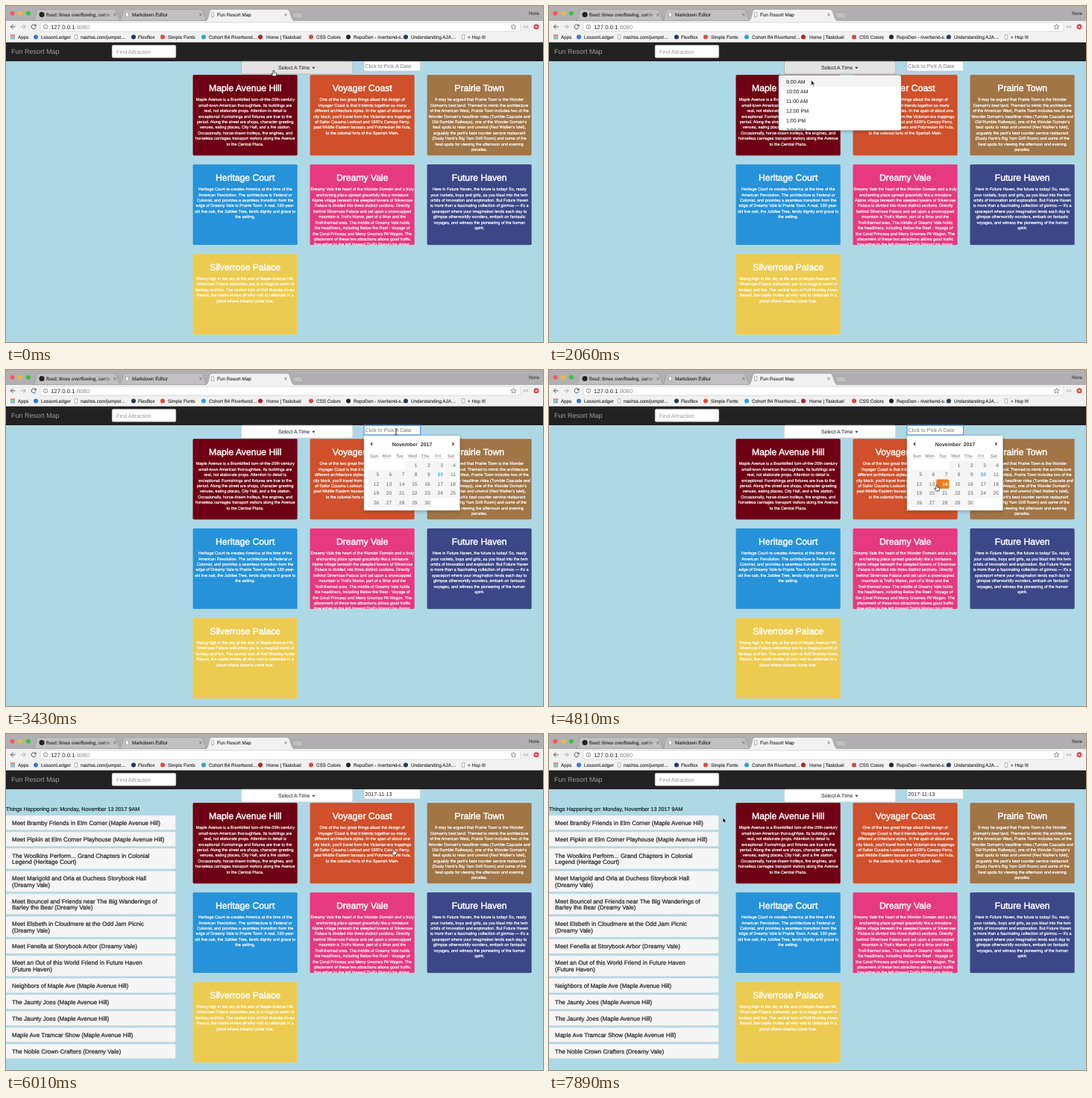
An HTML page for the animation above (8000 ms loop, 720x450 px).

```html
<!DOCTYPE html>
<html lang="en">
<head>
<meta charset="utf-8">
<title>Fun Resort Map</title>
<style>
  html, body { margin: 0; width: 100%; height: 100%; overflow: hidden; background: #add8e6; }
  #stage { display: block; width: 100vw; height: 100vh; }
  text { font-family: "Liberation Sans", Arial, sans-serif; text-rendering: geometricPrecision; white-space: pre; }
  .shadow { filter: drop-shadow(0 1.5px 2px rgba(0, 0, 0, .3)); }
</style>
</head>
<body>
<svg id="stage" viewBox="0 0 720 450"></svg>
<script>
const LOOP = 8000, STEP = 171.6;
const stage = document.getElementById('stage');

const text = (str, x, y, size, fill, { anchor = 'start', heavy = 0, extra = '' } = {}) =>
  `<text x="${x}" y="${y}" font-size="${size}" fill="${fill}" text-anchor="${anchor}"` +
  (heavy ? ` stroke="${fill}" stroke-width="${heavy}"` : '') + ` ${extra}>${str}</text>`;
const rect = (x, y, w, h, fill, extra = '') =>
  `<rect x="${x}" y="${y}" width="${w}" height="${h}" fill="${fill}" ${extra}/>`;
const dot = (x, y, r, fill) => `<circle cx="${x}" cy="${y}" r="${r}" fill="${fill}"/>`;
const path = (d, fill, extra = '') => `<path d="${d}" fill="${fill}" ${extra}/>`;
const line = (d, color, width = 1) => path(d, 'none', `stroke="${color}" stroke-width="${width}"`);
const group = (id, content, extra = '') => `<g id="${id}" ${extra}>${content}</g>`;
const page = (x, y) => rect(x - 1.8, y - 2.7, 3.6, 5.4, '#fff', 'stroke="#888" stroke-width=".6"');

function browser() {
  const strip = '#b1afb1', idleTab = '#c1bfc1', toolbar = '#f2f1f2', edge = '#969496';
  const tab = (x, fill) =>
    path(`M${x} 19.5Q${x + 2} 19 ${x + 3} 16L${x + 5} 7Q${x + 6} 4.5 ${x + 8} 4.5H${x + 109}` +
      `Q${x + 111} 4.5 ${x + 112} 7L${x + 115} 16Q${x + 116} 19 ${x + 118} 19.5Z`, fill, `stroke="${edge}" stroke-width=".6"`);
  const close = x => line(`M${x - 1.6} 10l3.2 3.2m0 -3.2l-3.2 3.2`, '#555', .7);
  const bookmarks = [
    [40, 47, '#3478d8', 'LessonLedger'], [94, 100, '', 'nashss.com/jumpst…'], [171, 177, '#20395a', 'FlexBox'],
    [210, 217, '#e04a38', 'Simple Fonts'], [265, 272, '#28a5cf', 'Cohort B4 Riverbend…'],
    [341, 349, '#b32020', 'Home | Taskduel'], [409, 416, '#d64b46', 'CSS Colors'],
    [459, 466, '#222', 'RepoDen - riverbend-s…'], [536, 543, '#263c55', 'Understanding AJA…'], [613, 619, '', '+ Hop It!']
  ];
  let out = rect(0, 0, 720, 20, strip) + rect(0, 19.5, 720, 30, toolbar) + line('M0 19.5H720', edge, .6);
  ['#fb5a55', '#e7bb3d', '#32c548'].forEach((color, i) => out += dot(8.5 + 10.7 * i, 9.7, 3, color));
  out += tab(36, idleTab) + tab(152, idleTab) + tab(268, toolbar) + rect(269, 19, 116, 1, toolbar);
  out += dot(48, 11.6, 3.5, '#222') + page(162.5, 11.6) + page(277, 11.6);
  out += text('fixed: times overflowing, cente', 54, 13.9, 6.4, '#222', { heavy: .08 }) + rect(133, 8, 8, 8, idleTab, 'opacity=".5"');
  out += text('Markdown Editor', 169, 13.9, 6.4, '#222', { heavy: .08 }) + text('Fun Resort Map', 283, 13.9, 6.4, '#222', { heavy: .08 });
  out += [146, 261, 375].map(close).join('');
  out += path('M384 9H395Q396.5 9 397 10.5L399 16H388Q386.5 16 386 14.5Z', idleTab, `stroke="${edge}" stroke-width=".5"`);
  out += text('Nora', 701, 12, 6.4, '#222');

  out += line('M12.5 27.8H6.5M9.3 24.8L6.3 27.8L9.3 30.8', '#555') + line('M20 27.8H26M23.3 24.8L26.3 27.8L23.3 30.8', '#aaa');
  out += line('M39.7 26.2A3 3 0 1 0 40 28.6', '#555') + path('M40.6 24.2V27.2H37.6Z', '#555');
  out += rect(46, 22, 644, 12, '#fff', 'rx="2" stroke="#c8c6c8" stroke-width=".6"');
  out += `<circle cx="53" cy="27.8" r="2.8" fill="none" stroke="#666" stroke-width=".7"/>` + line('M53 27.3V29.6M53 25.9V26.6', '#666', .7);
  out += text('127.0.0.1<tspan fill="#888">:8080</tspan>', 60, 30.5, 7.8, '#222');
  out += path('M680.5 24.3L681.5 26.7L684 26.9L682.1 28.5L682.7 31L680.5 29.7L678.3 31L678.9 28.5L677 26.9L679.5 26.7Z', 'none', 'stroke="#666" stroke-width=".7"');
  out += line('M694.5 25.5V30M699.5 25.5V30', '#b9a4a8', .8) + dot(697, 27.8, 1.1, '#b9a4a8');
  out += dot(711, 27.8, 3.5, '#d8453d') + line('M709.3 27.8H712.7M711 26.1V29.5', '#fff', .8);

  ['#e2483d', '#46a851', '#3f7de0'].forEach((color, row) => {
    for (let col = 0; col < 3; col++) out += rect(6 + 2.2 * col, 38.3 + 2.2 * row, 1.6, 1.6, color);
  });
  out += text('Apps', 16, 43.7, 6.3, '#222', { heavy: .1 });
  for (const [iconX, x, color, label] of bookmarks)
    out += (color ? dot(iconX, 41.4, 3, color) : page(iconX, 41.4)) + text(label, x, 43.7, 6.3, '#222', { heavy: .1 });
  return out;
}

function navbar() {
  return rect(0, 49, 720, 25, '#222') + line('M0 49H720', '#111', .6) +
    text('Fun Resort Map', 7, 64.1, 9, '#9d9d9d') +
    rect(142.2, 52.4, 85.6, 16.9, '#fff', 'rx="1.6" stroke="#ccc" stroke-width=".4"') +
    text('Find Attraction', 148, 63.6, 7.3, '#999');
}

const lands = [
  ['Maple Avenue Hill', '#6e0013', `Maple Avenue is a Brambified turn-of-the-20th-century
small-town American thoroughfare. Its buildings are
real, not elaborate props. Attention to detail is
exceptional: Furnishings and fixtures are true to the
period. Along the street are shops, character-greeting
venues, eating places, City Hall, and a fire station.
Occasionally, horse-drawn trolleys, fire engines, and
horseless carriages transport visitors along the Avenue
to the Central Plaza.`],
  ['Voyager Coast', '#cf502a', `One of the two great things about the design of
Voyager Coast is that it blends together so many
different architecture styles. In the span of about one
city block, you'll travel from the Victorian-era trappings
of Sailor Cousins Lookout and 1920's Canopy Ferry,
past Middle Eastern bazaars and Polynesian tiki huts,
to the colonial forts of the Spanish Main.`],
  ['Prairie Town', '#a17546', `It may be argued that Prairie Town is the Wonder
Domain's best land. Themed to mimic the architecture
of the American West, Prairie Town includes two of the
Wonder Domain's headliner rides (Tumble Cascade and
Old Rumble Railways), one of the Wonder Domain's
best spots to relax and unwind (Ned Walker's Islet),
arguably the park's best counter service restaurant
(Dusty Hank's Big Yarn Grill Room) and some of the
best spots for viewing the afternoon and evening
parades.`],
  ['Heritage Court', '#2592d9', `Heritage Court re-creates America at the time of the
American Revolution. The architecture is Federal or
Colonial, and provides a seamless transition from the
edge of Dreamy Vale to Prairie Town. A real, 130-year-
old live oak, the Jubilee Tree, lends dignity and grace to
the setting.`],
  ['Dreamy Vale', '#e6397f', `Dreamy Vale the heart of the Wonder Domain and a truly
enchanting place spread gracefully like a miniature
Alpine village beneath the steepled towers of Silverrose
Palace is divided into three distinct sections. Directly
behind Silverrose Palace and set upon a snowcapped
mountain is Troll's Manor, part of a Briar and the
Troll-themed area. The middle of Dreamy Vale holds
the headliners, including Below the Reef - Voyage of
the Coral Princess and Merry Gnomes Pit Wagon. The
placement of these two attractions allows good traffic
flow either to the left (toward Troll's Manor) for dining,`],
  ['Future Haven', '#3c4788', `Here in Future Haven, the future is today! So, ready
your rockets, boys and girls, as you blast into the twin
orbits of innovation and exploration. But Future Haven
is more than a fascinating collection of gizmos — it's a
spaceport where your imagination lends each day to
glimpse otherworldly wonders, embark on fantastic
voyages, and witness the pioneering of the human
spirit.`],
  ['Silverrose Palace', '#edcb50', `Rising high in the sky at the end of Maple Avenue Hill,
Silverrose Palace welcomes you to a magical world of
fantasy and fun. The central icon of Rolf Bramby Acres
Resort, the castle invites all who visit to celebrate in a
place where dreams come true.`]
];

function card([title, color, body], i) {
  const x = 250 + 157 * (i % 3), y = 91.7 + 119.9 * Math.floor(i / 3);
  const lines = body.split('\n').map((str, row) =>
    text(str, 70.7, 35.5 + 7.44 * row, 5.5, '#fff', { anchor: 'middle', heavy: .2 })).join('');
  return `<svg x="${x}" y="${y}" width="141.2" height="109">` +
    rect(.3, .3, 140.6, 108.4, color, 'rx="1.8" stroke="#ddd" stroke-opacity=".6" stroke-width=".6"') +
    text(title, 70.7, 22.7, 12.2, '#fff', { anchor: 'middle', heavy: .45 }) + lines + '</svg>';
}

const events = [
  'Meet Bramby Friends in Elm Corner (Maple Avenue Hill)',
  'Meet Pipkin at Elm Corner Playhouse (Maple Avenue Hill)',
  'The Woolkins Perform... Grand Chapters in Colonial\nLegend (Heritage Court)',
  'Meet Marigold and Orla at Duchess Storybook Hall\n(Dreamy Vale)',
  'Meet Bouncel and Friends near The Big Wanderings of\nBarley the Bear (Dreamy Vale)',
  'Meet Elsbeth in Cloudmere at the Odd Jam Picnic\n(Dreamy Vale)',
  'Meet Fenella at Storybook Arbor (Dreamy Vale)',
  'Meet an Out of this World Friend in Future Haven\n(Future Haven)',
  'Neighbors of Maple Ave (Maple Avenue Hill)',
  'The Jaunty Joes (Maple Avenue Hill)',
  'The Jaunty Joes (Maple Avenue Hill)',
  'Maple Ave Tramcar Show (Maple Avenue Hill)',
  'The Noble Crown Crafters (Dreamy Vale)'
];

function eventList() {
  let y = 108;
  let out = text('Things Happening on: Monday, November 13 2017 9AM', 0, 102.6, 7.2, '#1c2a33', { heavy: .22 });
  for (const event of events) {
    const rows = event.split('\n'), height = rows.length > 1 ? 30.4 : 22;
    out += rect(-1, y + 1.1, 228.3, height - 2.7, '#f5f5f5', 'rx="1.5" stroke="#d8d8d8" stroke-width=".5"');
    rows.forEach((str, i) => out += text(str, 8, y + 13.8 + 8.6 * i, 8, '#222', { heavy: .22 }));
    y += height;
  }
  return out;
}

function timeMenu() {
  const hours = ['9:00 AM', '10:00 AM', '11:00 AM', '12:00 PM', '1:00 PM', '2:00 PM'];
  return rect(308, 92.8, 164, 73.6, '#fff', 'rx="2" stroke="#bbb" stroke-width=".5" class="shadow"') +
    '<svg x="308" y="93" width="164" height="73.2">' +
    rect(0, 2, 164, 13, '#f3f3f3', 'id="menuHover"') +
    hours.map((hour, i) => text(hour, 10, 11.1 + 13 * i, 7, '#333', { heavy: .08 })).join('') + '</svg>';
}

function calendar() {
  const cell = 17.15, left = 485, rowHeight = 12.5, top = 121.4;
  let out = rect(480, 88, 128.5, 100, '#fff', 'stroke="#ccc" stroke-width=".5" class="shadow"');
  out += text('November  2017', 544.5, 101.7, 7, '#333', { anchor: 'middle', extra: 'font-weight="bold"' });
  out += path('M491.2 96.3V101.7L488.2 99Z', '#555') + path('M598.4 96.3V101.7L601.4 99Z', '#555');
  ['Sun', 'Mon', 'Tue', 'Wed', 'Thu', 'Fri', 'Sat'].forEach((day, i) => {
    const x = left + cell * (i + .5);
    out += text(day, x, 117, 5.8, '#999', { anchor: 'middle', extra: 'font-weight="bold"' });
    out += line(`M${x - 5.5} 118.4h11`, '#bbb', .5);
  });
  for (let day = 1; day <= 30; day++) {
    const slot = day + 2, x = left + cell * (slot % 7), y = top + rowHeight * Math.floor(slot / 7);
    const label = (color, extra = '') => text(day, x + cell - 2, y + 8.5, 6.7, color, { anchor: 'end', extra });
    out += rect(x, y, cell, rowHeight, '#f5f5f5');
    out += day === 10 ? label('#3af', 'font-weight="bold"') : label('#666');
    if (day === 14)
      out += group('dayHover', rect(x, y, cell, rowHeight, '#f07a14', 'rx="1.5"') + label('#fff', 'font-weight="bold"'));
  }
  return out;
}

const outline = (fill, edge) => `fill="${fill}" stroke="${edge}" stroke-width=".7" stroke-linejoin="round"`;
const cursorShapes =
  `<path id="hand" d="M-.9 .6Q0 -.8 .9 .6V2.9L3.4 3.5Q4.2 3.8 4 5L3.2 8H-1L-3.2 4.8Q-3 3.6 -1.8 4.4L-.9 5.2Z" ${outline('#fff', '#111')}/>` +
  `<path id="arrow" d="M0 0V7.2L1.7 5.7L2.8 8.1L4 7.5L2.9 5.2H5.2Z" ${outline('#000', '#fff')}/>` +
  group('beam', line('M-1.6 -4Q0 -4 0 -3V3Q0 4 -1.6 4M1.6 -4Q0 -4 0 -3M0 3Q0 4 1.6 4', '#111', .8));

stage.innerHTML = rect(0, 0, 720, 450, '#add8e6') + browser() + navbar() +
  rect(315.5, 74.2, 149.3, 16.8, '#fff', 'rx="1.8" stroke-width=".7" id="button"') +
  text('Select A Time', 365, 85.4, 7, '#333', { heavy: .08 }) + path('M410.3 81.8H414.5L412.4 84.2Z', '#333') +
  rect(480, 74.2, 75.6, 12.8, '#fff', 'stroke="#bbb" stroke-width=".6" id="dateBox"') +
  text('', 481.3, 82.9, 7.2, '#777', { extra: 'id="dateText"' }) +
  lands.map(card).join('') + group('events', eventList()) + group('menu', timeMenu()) +
  group('calendar', calendar()) + group('cursor', cursorShapes);

const part = Object.fromEntries([...stage.querySelectorAll('[id]')].map(el => [el.id, el]));
const show = (name, visible) => part[name].setAttribute('display', visible ? 'inline' : 'none');
const setAll = (name, attrs) => Object.entries(attrs).forEach(([key, value]) => part[name].setAttribute(key, value));

// Pointer stops: time, x, y
const stops = [
  [0, 358.8, 86], [1200, 358.8, 86], [1850, 351.6, 99.2], [2350, 351.6, 99.2], [3000, 523, 82.8],
  [3550, 523, 82.8], [4550, 519.8, 154], [6100, 519.8, 154], [7250, 233, 111.8], [LOOP, 233, 111.8]
];

function pointer(t) {
  const i = stops.findIndex(stop => stop[0] > t);
  const [t0, x0, y0] = stops[i - 1], [t1, x1, y1] = stops[i];
  const u = (t - t0) / (t1 - t0), eased = u * u * (3 - 2 * u);
  return [x0 + (x1 - x0) * eased, y0 + (y1 - y0) * eased];
}

function draw(t) {
  const menuOpen = t >= 500 && t < 2350, calendarOpen = t >= 3080 && t < 5140, picked = t >= 5140;
  const [x, y] = pointer(t);
  const onButton = y < 91 && x < 465;
  const pressed = menuOpen && onButton, lit = menuOpen || onButton;
  setAll('button', {
    fill: pressed ? '#d2d1d1' : lit ? '#e4e3e3' : '#fff',
    stroke: pressed ? '#8c8c8c' : lit ? '#adadad' : '#ccc'
  });
  setAll('dateBox', { stroke: calendarOpen ? '#5ba3e0' : '#bbb', 'stroke-width': calendarOpen ? 1.3 : .6 });
  part.dateText.textContent = picked ? '2017-11-13' : 'Click to Pick A Date';
  part.dateText.setAttribute('fill', picked ? '#222' : '#777');
  show('menu', menuOpen);
  show('menuHover', !onButton);
  show('calendar', calendarOpen);
  show('dayHover', y > 146.4);
  show('events', t >= 5320);

  const kind = t < 1250 || (t >= 4000 && t < 6150) ? 'hand' : t >= 2900 && t < 3700 ? 'beam' : 'arrow';
  for (const name of ['hand', 'arrow', 'beam']) show(name, name === kind);
  part.cursor.setAttribute('transform', `translate(${x} ${y})`);
}

const start = performance.now();
function tick() {
  const t = (performance.now() - start) % LOOP;
  draw(Math.min(46, Math.floor((t + 6) / STEP)) * STEP);
  requestAnimationFrame(tick);
}
tick();
</script>
</body>
</html>
```
